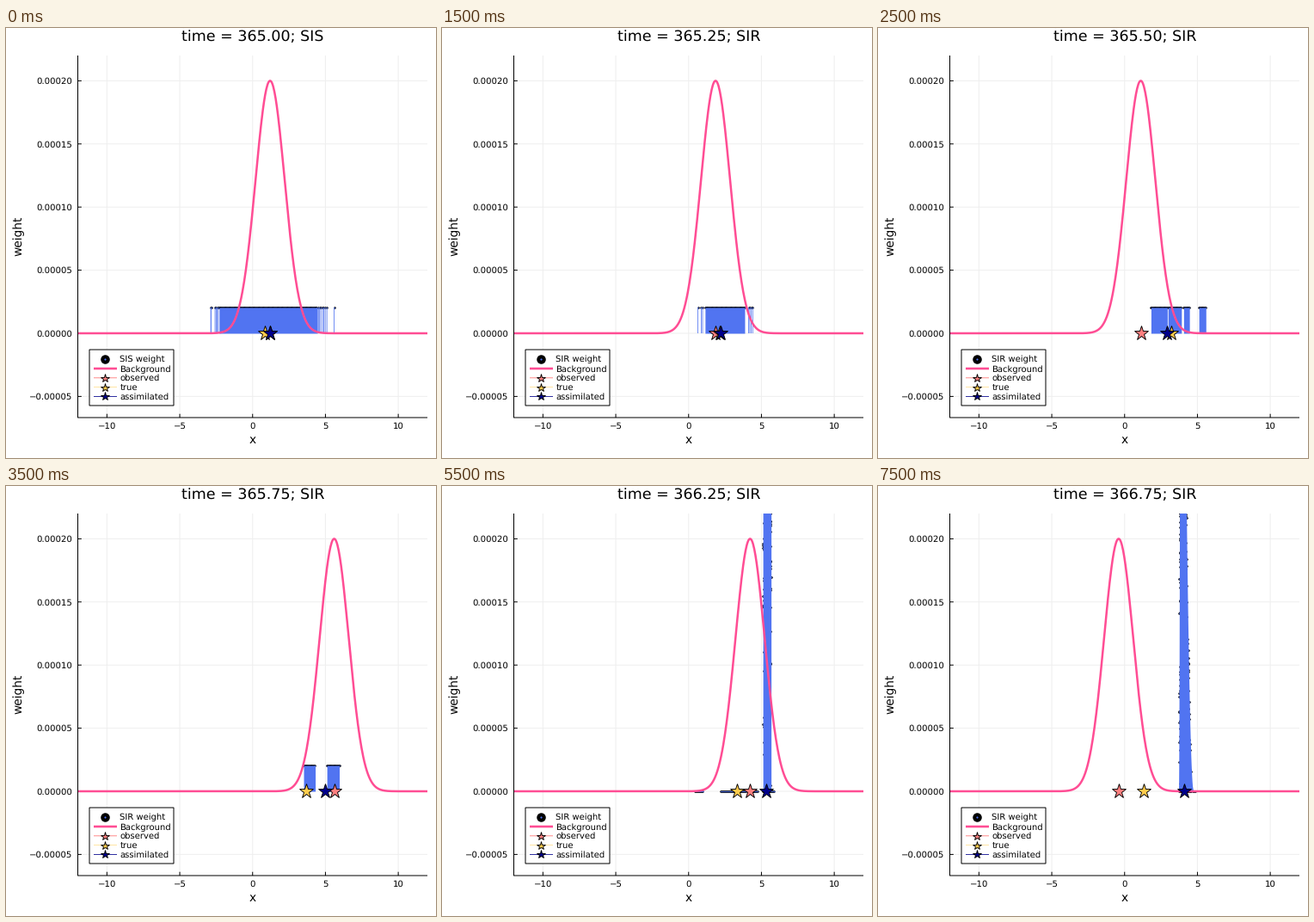
A matplotlib script for the animation above (8 s loop, 500x500 px).

```python
import matplotlib.pyplot as plt
import numpy as np
from matplotlib.animation import ArtistAnimation

plt.rcParams.update({"text.hinting": "none", "font.family": "DejaVu Sans"})

PT = 0.72  # points per pixel at 100 dpi
PINK, BLUE = "#ff4d94", "#5174f1"
ROSE, GOLD, NAVY = "#ff7f7f", "#ffcc4d", "#00008b"
LEFT, RIGHT, TOP, BOTTOM = 83.5, 490, 32, 453  # plot area in pixels
W = 2.04  # uniform particle weight, in units of 1e-5
STEM = dict(color=BLUE, zorder=3, snap=False)
rng = np.random.default_rng(7)

fig = plt.figure(figsize=(5, 5), dpi=100, facecolor="white")
page = fig.add_axes([0, 0, 1, 1])  # pixel coordinates
page.set(xlim=(0, 500), ylim=(500, 0))
page.axis("off")
ax = fig.add_axes([LEFT / 500, 1 - BOTTOM / 500,
                   (RIGHT - LEFT) / 500, (BOTTOM - TOP) / 500])
ax.set(xlim=(-12, 12), ylim=(-6.676, 22))
ax.axis("off")


def label(x, y, s, size, ha="left", **kw):
    return page.text(x, y, s, fontsize=size * PT, ha=ha, va="baseline", **kw)


def line(x, y, color="black", lw=1.0, **kw):
    page.plot(x, y, color=color, lw=lw * PT, snap=False,
              solid_capstyle="butt", **kw)


def star(a, x, y, size, color):
    return a.plot(x, y, "*", ms=size * PT, mfc=color, mec="black",
                  mew=0.9 * PT, zorder=6, clip_on=False)


def signed(s, v):
    return "\u2212" + s if v < 0 else s


def draw_axes():
    for v in range(-10, 11, 5):
        x = LEFT + (v + 12) * (RIGHT - LEFT) / 24
        line([x, x], [TOP, BOTTOM], "#efefef", zorder=1)
        line([x, x], [BOTTOM - 4.3, BOTTOM])
        label(x, 466.3, signed(str(abs(v)), v), 10.1, "center")
    for v in range(-5, 21, 5):
        y = 355 - 14.68 * v
        line([LEFT, RIGHT], [y, y], "#efefef", zorder=1)
        line([LEFT, LEFT + 4.3], [y, y])
        label(77, y + 3.7, signed(f"{abs(v) * 1e-5:.5f}", v), 10.1, "right")
    line([LEFT, LEFT, RIGHT], [TOP, BOTTOM, BOTTOM])
    label(286.8, 483, "x", 13.8, "center")
    label(18.5, 242, "weight", 13.8, "center", rotation=90,
          rotation_mode="anchor")


def draw_legend():
    page.add_patch(plt.Rectangle((97, 374), 98, 65, fc="white", ec="black",
                                 lw=PT, snap=False, zorder=1.5))
    page.plot(115, 384.8, "o", ms=10.5 * PT, color="black", mew=0)
    page.plot(115, 384.8, "o", ms=2.2 * PT, color=BLUE, mew=0)
    line([102, 129], [396, 396], PINK, 2.6)
    label(132.4, 399.5, "Background", 10)
    rows = [("observed", ROSE, 0.9), ("true", GOLD, 0.5), ("assimilated", NAVY, 0.8)]
    for i, (name, color, lw) in enumerate(rows):
        y = 406.8 + 10.8 * i
        line([102, 129], [y, y], color, lw)
        star(page, 115, y, 9.5, color)
        label(132.4, y + 3.5, name, 10)


def dots(x, h):
    return ax.plot(x, h, "o", ms=1.7 * PT, mfc=BLUE, mec="black",
                   mew=0.8 * PT, zorder=2)


def row(lo, hi):
    """Particles of nearly zero weight."""
    x = np.arange(lo, hi, 0.06)
    return dots(x, 0 * x) + ax.plot([lo, hi], [0, 0], color=BLUE,
                                    lw=0.8 * PT, zorder=2.5)


def flat(spans, strays=()):
    """Equal weights: dense spans plus single stems."""
    out = []
    for lo, hi in spans:
        x = np.arange(lo, hi, 0.05)
        out += dots(x, W + 0 * x)
        out.append(ax.fill_between([lo, hi], 0, W, lw=0, **STEM))
    if strays:
        out += dots(strays, [W] * len(strays))
        out.append(ax.vlines(strays, 0, W, lw=0.8 * PT, **STEM))
    return out


def spike(base, tip, peak, n=150):
    """Weighted cluster narrowing from base to tip, with dots along its edges."""
    def edges(u):
        s = np.sqrt(u)
        return [b + (t - b) * s for b, t in zip(base, tip)]

    u = np.linspace(0, 1, 60)
    body = ax.fill_betweenx(u * peak, *edges(u), lw=0, **STEM)
    v = rng.random(n)
    lo, hi = edges(v)
    return dots(lo + (hi - lo) * rng.random(n), v * peak) + [body]


def start():
    return flat([(-2.3, 4.45)],
                [-2.87, -2.84, -2.58, -2.5, -2.42, -2.36, 4.52, 4.6, 4.68,
                 4.8, 4.88, 4.98, 5.1, 5.6])


def spread():
    return row(-2, 6.5) + spike((0.5, 4.5), (2, 2.4), 9, 400)


def merged():
    return flat([(1.13, 3.85)], [0.64, 0.87, 0.96, 4.12, 4.2, 4.3, 4.4])


def split():
    return (row(0.2, 5.6) + spike((1.8, 3.9), (2.6, 3.1), 14, 250)
            + spike((4.05, 4.45), (4.2, 4.3), 6, 40)
            + spike((5.1, 5.55), (5.3, 5.4), 4, 30))


def clumps():
    return flat([(1.81, 2.93), (2.98, 3.9), (4.05, 4.45), (5.1, 5.58)])


def rising():
    return (row(1.2, 5.9) + spike((3.6, 4.3), (3.9, 4.1), 12, 80)
            + spike((5.1, 5.9), (5.3, 5.8), 26))


def regrouped():
    return flat([(3.5, 4.3), (5.1, 5.95)])


def towers():
    return (row(1.75, 4.8) + spike((3.22, 3.68), (3.5, 3.57), 21.3, 110)
            + spike((4.0, 4.25), (4.1, 4.12), 0.8, 8)
            + spike((5.47, 5.92), (5.47, 5.92), 24))


def wall():
    return (row(0.4, 1.0) + row(2.2, 4.75) + row(5.1, 5.9)
            + spike((5.1, 5.66), (5.1, 5.66), 24))


def peaked():
    return row(1.5, 8.1) + spike((4.3, 5.45), (4.4, 5.0), 26, 250)


def block():
    return flat([(4.37, 5.4)])


def slope():
    return row(3.75, 4.85) + spike((3.7, 4.72), (3.77, 4.22), 24, 350)


# time, observed, true, assimilated, particles before and after resampling
STEPS = [
    (365.00, 1.20, 0.87, 1.22, start, start),
    (365.25, 1.85, 2.15, 2.18, spread, merged),
    (365.50, 1.11, 3.23, 2.90, split, clumps),
    (365.75, 5.60, 3.70, 5.00, rising, regrouped),
    (366.00, 2.69, 3.82, 5.61, towers, towers),
    (366.25, 4.22, 3.34, 5.33, wall, wall),
    (366.50, 2.61, 2.43, 4.76, peaked, block),
    (366.75, -0.41, 1.34, 4.10, slope, slope),
]


def build_frame(kind, time, obs, true, mean, particles):
    x = np.linspace(-12, 12, 600)
    out = particles()
    out += ax.plot(x, 20 * np.exp(-(x - obs) ** 2 / 2), color=PINK,
                   lw=2.5 * PT, zorder=5)
    for pos, color in ((obs, ROSE), (true, GOLD), (mean, NAVY)):
        out += star(ax, pos, 0, 17.5, color)
    out.append(label(287, 15.3, f"time = {time:.2f}; {kind}", 17.5, "center"))
    out.append(label(132.4, 388.4, f"{kind} weight", 10))
    return out


draw_axes()
draw_legend()
frames = []
for time, obs, true, mean, before, after in STEPS:
    for kind, particles in (("SIS", before), ("SIR", after)):
        state = rng.bit_generator.state
        frames.append(build_frame(kind, time, obs, true, mean, particles))
        if before is after and kind == "SIS":
            rng.bit_generator.state = state  # same scatter in both views

anim = ArtistAnimation(fig, frames, interval=500, repeat=True, repeat_delay=0)
plt.show()
```
